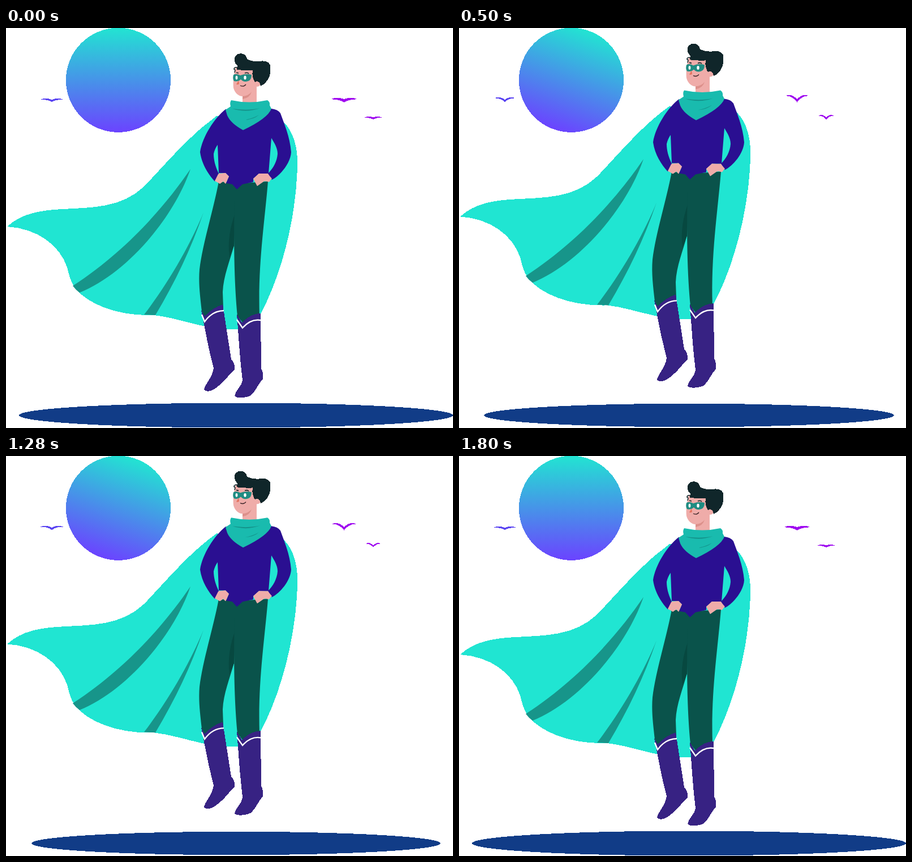
Write an HTML page that moves like this. It is 790 px wide and 709 px high and loops after 1.82 s.

```html
<!DOCTYPE html>
<html lang="en">
<head>
<meta charset="utf-8">
<title>Hovering hero</title>
<style>
  html, body { margin: 0; width: 100%; height: 100%; overflow: hidden; background: #fff; }
  svg { display: block; width: 790px; height: 709px; }
  .shirt { fill: #2a0f91; }
  .skin { fill: #efaca9; }
  .hair { fill: #10262a; }
  .pants { fill: #0a534b; }
  .boot { fill: #372283; }
  .fold { fill: #17958a; }
  .trim { fill: none; stroke: #fff; stroke-width: 2.4; }
  .crisp, .boot, .hair { shape-rendering: crispEdges; }
</style>
</head>
<body>
<svg viewBox="0 0 790 709">
  <defs>
    <linearGradient id="sky" gradientUnits="userSpaceOnUse" x1="198.5" y1="0" x2="198.5" y2="185">
      <stop offset="0" stop-color="#22e4d2"/>
      <stop offset="1" stop-color="#6b43ff"/>
    </linearGradient>
  </defs>

  <circle class="crisp" cx="198.5" cy="92.3" r="92.6" fill="url(#sky)"/>
  <ellipse class="crisp" id="shadow" cx="406.5" cy="686.5" fill="#113c87"/>
  <g class="crisp">
    <path id="left" fill="#5b45f2"/>
    <path id="big" fill="#a00bf0"/>
    <path id="small" fill="#a00bf0"/>
  </g>

  <g id="hero">
    <!-- cape -->
    <path class="crisp" fill="#20e5d2" d="M2 352C28 328 62 323 100 321C150 318 204 320 245 280C290 232 325 190 372 156L490 166C509 185 516 213 515 245C513 335 488 436 449 509L410 534L391 534C350 533 300 513 262 509C200 511 146 491 122 461C113 448 111 435 108 424C95 385 55 355 2 352Z"/>
    <path class="fold" d="M326 250C290 303 221 390 118 457Q123 464 130 469C212 436 296 338 326 250Z"/>
    <path class="fold" d="M349 327C327 382 287 452 244 508L264 509C299 450 327 392 349 327Z"/>

    <!-- legs -->
    <path class="pants" d="M376 272L410 276L405 345L403 385C396 412 384 440 383 468L384 496L351 512L346 502C343 475 340 452 342 428C348 380 366 325 376 272Z"/>
    <path fill="#074840" d="M405 328C397 350 391 377 395 406L403 386Z"/>
    <path class="pants" d="M405 276L463 272C457 345 445 420 448 510L418 522L409 510C404 460 401 380 405 276Z"/>

    <!-- boots -->
    <path class="boot" d="M345 500L351 511Q365 496 383 490L398 587Q405 594 404 605C394 614 387 626 376 634C367 643 354 647 350 641C351 632 364 621 367 603C358 570 352 535 345 500Z"/>
    <path class="trim" d="M346 508L351 520.5Q365 501 385 501"/>
    <path class="boot" d="M408 507L417 522Q433 506 450 506L451 604Q455 610 454 622C446 630 442 643 433 651C424 656 407 657 404 652C405 643 417 635 418 624C413 585 411 545 408 507Z"/>
    <path class="trim" d="M408 517L418 531.5Q433 515 450 518"/>

    <!-- hands, arms and torso -->
    <path class="skin" d="M369 269L375 258L388 257L394 263L388 276L384 271L378 276Z"/>
    <path class="skin" d="M437 267L447 258L463 258L470 266L465 273L457 271L444 280Z"/>
    <path class="shirt" d="M388 144C368 160 347 193 343 220C346 242 358 260 369 272L376 258C370 246 367 234 367 223Q369 214 374 207L376 257L388 257L394 263L389 275L400 277L408 286L418 277L437 273L437 267L447 258L464 258L469 195C475 205 480 213 480 223C479 237 472 249 463 258L470 269C484 262 503 240 504 220C502 193 491 168 485 151Q480 144 469 143Z"/>
    <path class="skin" d="M369 271L375 259L388 257L394 263L388 276L384 272L378 276Z"/>
    <path class="skin" d="M437 267L447 258L463 259L470 267L464 271L455 272L444 280Z"/>

    <!-- head -->
    <path class="skin" d="M406 70C402 84 401 96 402 106C404 114 410 121 418 121L418 136L443 136L443 104C450 104 453 98 449 93L440 92L437 68Z"/>
    <path fill="#dc908b" d="M418 121Q429 120 434 113Q431 124 418 126Z"/>
    <path class="hair" d="M408 74C412 74 424 76 436 75C434 84 437 91 440 96C443 93 449 94 450 103C459 99 466 89 467 80C466 77 467 74 467 71C469 60 458 57 448 59C440 60 431 58 426 55C425 45 412 42 406 49C402 54 403 62 409 67Z"/>
    <path fill="none" stroke="#10262a" stroke-width="1.6" d="M409 70Q403 69 403 73Q406 73 404 79M422 80Q427 78 429 81M407 79L411 80"/>
    <path fill="#1f8c82" d="M402 83Q407 80 414 84Q425 80 434 83Q434 92 428 94Q420 97 415 91Q410 96 403 94Q400 90 402 83Z"/>
    <g fill="#fff">
      <ellipse cx="407.5" cy="88" rx="1.9" ry="3.4"/>
      <ellipse cx="422.5" cy="88" rx="2.2" ry="3.4"/>
    </g>
    <path fill="#e5735f" d="M411 93L407 100Q412 101 412 98Z"/>
    <path fill="none" stroke="#3a2327" stroke-width="1.3" d="M414 102Q420 105 424 100"/>

    <!-- scarf -->
    <path fill="#19bbae" d="M398 128Q430 135 462 128Q467 131 466 137L469 143Q463 160 419 181Q397 169 391 155L388 145L397 139Q395 132 398 128Z"/>
    <g fill="#14928a">
      <path d="M400 143Q425 151 449 142Q428 147 400 143Z"/>
      <path d="M422 163Q438 162 447 154Q437 160 422 163Z"/>
    </g>
  </g>
</svg>
<script>
const LOOP = 1820, STEP = 20;
const el = id => document.getElementById(id);
const set = (id, attrs) => {
  for (const key in attrs) el(id).setAttribute(key, attrs[key]);
};

// 0 to 1 and back, with the turn at a chosen part of the period
const swing = (t, period, turn = 0.5) => {
  const p = t % period / period;
  return p < turn ? p / turn : (1 - p) / (1 - turn);
};
const ease = p => (1 - Math.cos(Math.PI * p)) / 2;

function wings(x, base, half, top, thick, tip) {
  const side = s =>
    `M${x + s * half} ${top + tip}Q${x + s * half * 0.5} ${top - 2} ${x} ${base - thick}` +
    `V${base}Q${x + s * half * 0.45} ${top + thick * 0.4} ${x + s * half} ${top + tip}Z`;
  return side(-1) + side(1);
}

function draw(t) {
  const slow = swing(t, 1800);
  const mid = swing(t, 900);
  const fast = swing(t, 600, 0.6);
  const scale = 1 - 0.1 * slow;

  set('hero', { transform: `translate(0 ${-30 * ease(slow)})` });
  set('shadow', { rx: 383.5 * scale, ry: 22 * scale });
  set('sky', { gradientTransform: `rotate(${20 * ease(mid)} 198.5 92)` });
  set('left', { d: wings(81, 131, 21 - 4.5 * fast, 124.5 - 6 * fast, 4, 2.5) });
  set('big', { d: wings(597.5, 131.5, 25.2 - 4.8 * mid, 123.5 - 7 * mid, 5.5, 3) });
  set('small', { d: wings(649, 162, 16 - 4.5 * slow, 157 - 6 * slow, 3.5, 2) });
}

const start = performance.now();
function tick(now) {
  const t = Math.max(0, now - start) % LOOP;
  draw(Math.floor(t / STEP) * STEP);
  requestAnimationFrame(tick);
}
draw(0);
requestAnimationFrame(tick);
</script>
</body>
</html>
```
